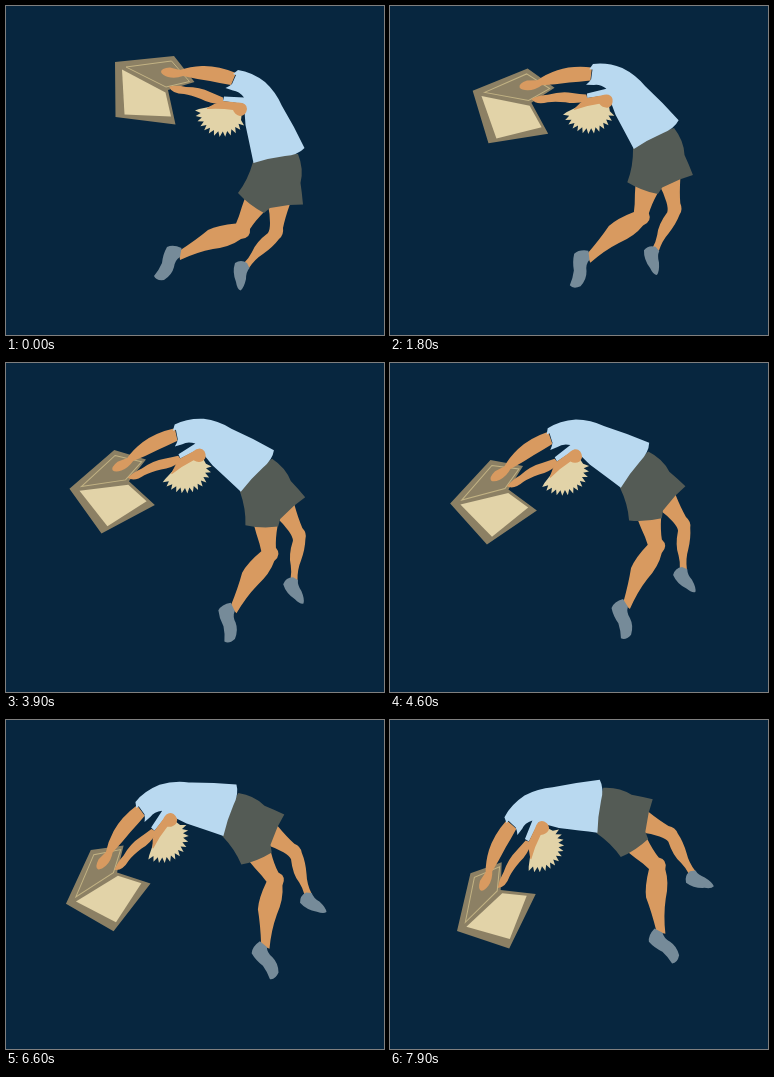
Animation of 378 by 329 pixels, one loop 8000 ms. Source, as an HTML page:

```html
<!DOCTYPE html>
<html lang="en">
<head>
<meta charset="utf-8">
<title>Tumbling figure</title>
<style>
  html, body { margin: 0; width: 100%; height: 100%; overflow: hidden; background: #07263f; }
  svg { display: block; width: 100vw; height: 100vh; }
  .skin { fill: #d89a60; }
  .shirt { fill: #b9d9f0; }
  .shorts { fill: #545b55; }
  .shoe { fill: #768b99; }
  .wood { fill: #8c8064; }
  .cream { fill: #e2d3a8; }
  .inlay { fill: none; stroke: #c3b384; stroke-width: 1; }
</style>
</head>
<body>
<svg viewBox="0 0 378 329">
  <rect width="378" height="329" fill="#07263f"/>
  <g id="figure">
    <!-- case -->
    <path class="wood" d="M109 56 168 50 188.5 76 162 84 169.5 118.5 109.5 111Z"/>
    <path class="cream" d="M116 63.5 159.5 86.5 165 110.5 118.5 108.5Z"/>
    <path class="inlay" d="M120 61 165.500 55 183.500 75.500 160 81Z"/>

    <!-- legs -->
    <path class="skin" d="M262 199 Q264 208 264 217 Q264 224 262 227 Q250 236 246 246 Q243 252 238 257 L243 262 Q249 253 257 248 Q267 241 273 233 Q278 229 277 222 Q279 212 284 198Z"/>
    <path class="skin" d="M239 192 Q236 200 233 210 L230 217.500 Q212 219 202 224 Q190 234 173 245 L174 254 Q191 246 207 243 Q224 241 235 233 Q245 232 244 223 Q249 215 258 206Z"/>
    <path class="shoe" d="M161 241 Q167 238 175.500 242 L174 251 Q169 254 168 261 Q166 269 158 274 Q150 275 148 270 Q153 264 156 257 Q157 248 161 241Z"/>
    <path class="shoe" d="M229 257 Q235 253 241 257 L243.500 262 Q240 266 240 273 Q238 282 234.500 284.500 Q231 283 230 276 Q226 266 229 257Z"/>

    <!-- clothes -->
    <path class="shorts" d="M247 156 Q268 147 292 148 Q298 163 294.500 177 Q296 187 297 198.500 L283 199 264 202 258 207 Q243 199 232 187 Q242 174 247 156Z"/>
    <path class="skin" d="M155 66 Q155 62 164 61.500 L174 64 Q184 60.500 196 60 Q212 59.500 230 67 L225 79 Q213 77 204 75 Q190 73 177 70 Q169 73 162 71 Q156 69 155 66Z"/>
    <path class="shirt" d="M232 64 Q246 66 259 76 Q270 86 276 100 Q288 120 298.500 142 Q292 149 279 150 Q263 152 247.500 157 Q244 140 239.500 119 L238 98 217 95 218 90.500 238 91.500 Q233 85 227 84.500 L219.500 82 Q224 80 226 78 L230 69 227 68Z"/>

    <!-- head -->
    <path id="hair" class="cream"/>
    <path class="skin" d="M201 102 Q209 97 217 95 L231 96.500 Q241 96 241 103 Q240 110 234 110 Q229 109 227 104 Q214 102 201 103Z"/>
    <path class="skin" d="M163 80.500 Q171 79 180 81 Q194 81 204 86 Q211 89 217 91.500 L217 98 Q204 98 195 93 Q185 89 178 88 Q166 88 163 80.500Z"/>
  </g>
</svg>
<script>
  const LOOP = 8000, STEP = 100, DEGREES_PER_STEP = -0.9;
  const PIVOT = "196.5 162.9";
  const figure = document.getElementById("figure");

  function hairPath(cx, cy, inner, outer, from, to, spikes) {
    const at = (radius, deg) => {
      const a = deg * Math.PI / 180;
      return `${(cx + radius * Math.cos(a)).toFixed(1)} ${(cy + radius * Math.sin(a)).toFixed(1)}`;
    };
    const gap = (to - from) / spikes;
    const points = [];
    for (let i = 0; i < spikes; i++) {
      points.push(at(inner, from + i * gap), at(outer, from + (i + 0.6) * gap));
    }
    return `M236 106 L${points.join(" ")} 193 103 203 101 218 96Z`;
  }

  function draw(time) {
    const step = Math.floor(time % LOOP / STEP);
    figure.setAttribute("transform", `rotate(${step * DEGREES_PER_STEP} ${PIVOT})`);
  }

  document.getElementById("hair").setAttribute("d", hairPath(216, 104, 21.5, 27, 28, 184, 13));

  const start = performance.now();
  function tick() {
    draw(performance.now() - start);
    requestAnimationFrame(tick);
  }
  tick();
</script>
</body>
</html>
```
